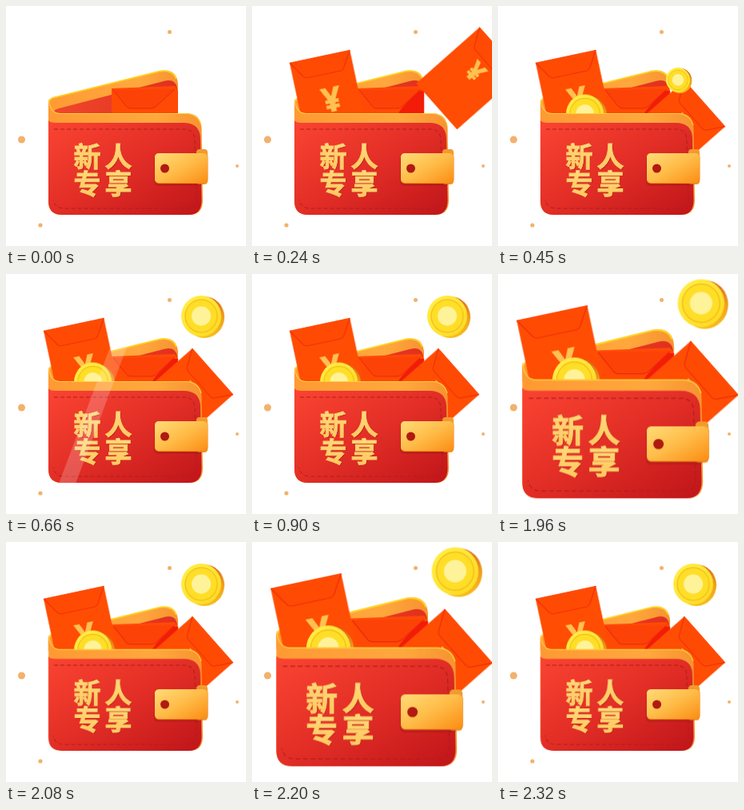
Recreate the animation shown at these times as an HTML page. Size 300x300 px, loop 3890 ms.

```html
<!DOCTYPE html>
<html lang="zh">
<head>
<meta charset="utf-8">
<title>新人专享</title>
<style>
html, body { margin: 0; width: 100%; height: 100%; overflow: hidden; background: #fff; }
svg { display: block; width: 100vw; height: 100vh; }
.pulse, .left, .right, .shade, .low, .high, .shine { animation: 3890ms linear infinite; }
.pulse { animation-name: pulse; transform-origin: 186px 147px; }
.left { animation-name: left; }
.right { animation-name: right; }
.shade { animation-name: shade; }
.low { animation-name: low; }
.high { animation-name: high; transform-origin: 246px 53px; }
.shine { animation-name: shine; }
.yen { font: 900 42px "Noto Sans", Arial, sans-serif; text-anchor: middle; fill: #ffc152; }
.title { font: 900 34px "Noto Sans CJK SC", "Noto Sans CJK", sans-serif; letter-spacing: 5px; }

/* two quick beats */
@keyframes pulse {
  0%, 47.275%, 53.445%, 59.614%, 100% { transform: scale(1); animation-timing-function: steps(4); }
  50.36%, 56.53% { transform: scale(1.17); animation-timing-function: steps(4); }
}
@keyframes left {
  0%, 1.53% { opacity: 0; transform: translate(-41px, -48px); }
  1.54% { opacity: 1; transform: translate(-41px, -48px); }
  6.17%, 100% { opacity: 1; transform: none; }
}
@keyframes right {
  0%, 3.85% { opacity: 0; transform: translate(90px, -84px); }
  3.86% { opacity: 1; transform: translate(90px, -84px); }
  6.17% { opacity: 1; transform: translate(52px, -67px); }
  9.25%, 100% { opacity: 1; transform: translate(0, 0); }
}
@keyframes shade {
  0%, 3.86% { opacity: 0; }
  6.17%, 100% { opacity: 1; }
}
@keyframes low {
  0%, 8.47% { opacity: 0; transform: translateY(-75px); }
  8.48% { opacity: 1; transform: translateY(-75px); }
  11.57%, 100% { opacity: 1; transform: none; }
}
@keyframes high {
  0%, 10.02% { opacity: 0; transform: translate(-30px, 60px) scale(.4); }
  10.03% { opacity: 1; transform: translate(-30px, 60px) scale(.4); }
  14.65%, 100% { opacity: 1; transform: translate(0, 0) scale(1); }
}
@keyframes shine {
  0%, 15.39% { opacity: 0; transform: translateX(-37px); }
  15.4% { opacity: 1; transform: translateX(-37px); animation-timing-function: steps(10); }
  23.12% { opacity: 1; transform: translateX(218px); }
  23.13%, 100% { opacity: 0; transform: translateX(218px); }
}
</style>
</head>
<body>
<svg viewBox="0 0 300 300">
  <defs>
    <linearGradient id="body" x1="0" y1="0" x2="1" y2="1">
      <stop offset="0" stop-color="#fb4432"/><stop offset=".5" stop-color="#e22e26"/><stop offset="1" stop-color="#c0151a"/>
    </linearGradient>
    <linearGradient id="rim" x1="0" y1="0" x2="1" y2="0">
      <stop offset="0" stop-color="#ff9a33"/><stop offset=".7" stop-color="#ffa83e"/><stop offset="1" stop-color="#f79330"/>
    </linearGradient>
    <linearGradient id="inner" x1="0" y1="0" x2="1" y2="0">
      <stop offset="0" stop-color="#f0472d"/><stop offset="1" stop-color="#e2301f"/>
    </linearGradient>
    <linearGradient id="gold" x1="0" y1="0" x2="1" y2="1">
      <stop offset="0" stop-color="#ffdc78"/><stop offset=".5" stop-color="#ffbc48"/><stop offset="1" stop-color="#fb8d14"/>
    </linearGradient>
    <linearGradient id="ink" x1="0" y1="0" x2="0" y2="1">
      <stop offset="0" stop-color="#ffdf83"/><stop offset="1" stop-color="#ffc558"/>
    </linearGradient>
    <linearGradient id="edge" x1="0" y1="0" x2="0" y2="1">
      <stop offset="0" stop-color="#d9601c"/><stop offset=".5" stop-color="#f0a01c"/><stop offset="1" stop-color="#f7c01c"/>
    </linearGradient>
    <linearGradient id="face" x1="0" y1="0" x2="1" y2="1">
      <stop offset="0" stop-color="#fff04a"/><stop offset="1" stop-color="#ffd820"/>
    </linearGradient>
    <path id="back" d="M53 136V121Q53 116 59 114L193 81Q213 78 215 97V140Z"/>
    <path id="front" d="M53 116Q54 134 68 134H225Q243 134 244.500 152L246 243Q246 261 229 261H70Q53 261 53 244Z"/>
    <g id="envelope">
      <rect width="77" height="106" rx="1" fill="#ff4d03"/>
      <path d="M0 0L13 20Q15 23 19 23H60Q63 23 65 20L77 0" fill="#ff4a04" stroke="#ee2a08"/>
    </g>
    <g id="coin">
      <ellipse cx="2" cy="1" rx="25" ry="26" fill="url(#edge)"/>
      <ellipse cx="-2" cy="-.5" rx="25" ry="25.500" fill="url(#face)"/>
      <ellipse cx="-2" cy="-.5" rx="20" ry="20.500" fill="#ffde28" stroke="#f3bd16" stroke-width="1.200"/>
      <circle cx="-2" cy="-.5" r="12" fill="#fff39a"/>
    </g>
    <clipPath id="art">
      <use href="#back"/>
      <use href="#front"/>
      <rect x="6" width="71" height="106" transform="translate(47 71) rotate(-12)"/>
      <rect width="77" height="106" transform="translate(233 93) rotate(48.5)"/>
      <circle cx="246" cy="53" r="26"/>
      <rect x="186" y="184" width="66" height="38" rx="5"/>
    </clipPath>
  </defs>

  <g fill="#f3b16c">
    <circle cx="19.500" cy="167" r="4.500"/>
    <circle cx="204.500" cy="32.500" r="2.500"/>
    <circle cx="289" cy="200" r="2"/>
    <circle cx="43" cy="274" r="2.600"/>
  </g>

  <g class="pulse">
    <use href="#back" fill="url(#rim)"/>
    <path d="M54 119Q55 116 60 114.500L193 81.500Q208 79.500 213 91" fill="none" stroke="#ffd21f" stroke-width="1.800"/>
    <path d="M58 136Q58 130 66 128L197 94Q212 90 214 103V136Z" fill="url(#inner)"/>

    <path d="M132 103L211 100L215 106V136H132Z" fill="#ff4a06"/>
    <path d="M134 105L150 125Q152 128 156 128H181Q184 128 187 126L211 104" fill="#fc4207" stroke="#ea2a08"/>
    <path class="shade" d="M183 134Q187 126 209 106H215V134Z" fill="#f21c09"/>

    <g class="left">
      <g transform="translate(47 71) rotate(-12)">
        <use href="#envelope"/>
        <text class="yen" x="42" y="71" stroke="#ffc152">¥</text>
      </g>
    </g>
    <g class="right">
      <g transform="translate(233 93) rotate(48.5)">
        <use href="#envelope"/>
        <text class="yen" x="38" y="53" style="font-size:34px" stroke="#ffc152">¥</text>
      </g>
    </g>
    <g class="low"><use href="#coin" transform="translate(110.500 135) scale(.94)"/></g>

    <use href="#front" fill="url(#rim)"/>
    <path d="M53.500 117Q55 134.500 68 134.500H225Q240 135 244 149" fill="none" stroke="#ffcd3c" stroke-width="1.200"/>
    <path d="M53 143Q55 146 62 146H222Q242 146 243 165L244.500 243Q244.500 261 228 261H70Q53 261 53 244Z" fill="url(#body)"/>
    <path d="M60 154H222Q235 154 236 167L238 240Q238 253 226 253H73Q61 253 59 242" fill="none" stroke="#b01f1c" stroke-dasharray="5 3"/>

    <g class="title">
      <text x="85.500" y="202" fill="#b7201a">新人</text>
      <text x="85.500" y="235.500" fill="#b7201a">专享</text>
      <g fill="url(#ink)" stroke="#ffd06c" stroke-width=".9">
        <text x="84.500" y="201">新人</text>
        <text x="84.500" y="234.500">专享</text>
      </g>
    </g>

    <rect x="238" y="179" width="14" height="44" rx="4" fill="#f29a2e"/>
    <rect x="185" y="187" width="61" height="38" rx="5" fill="#9c1715" opacity=".35"/>
    <rect x="186" y="184" width="66.500" height="38" rx="5" fill="#f08a1c"/>
    <rect x="186" y="184" width="66" height="37" rx="5" fill="url(#gold)"/>
    <circle cx="198.500" cy="203" r="5.500" fill="#b01a10"/>

    <g class="high"><use href="#coin" transform="translate(246 53)"/></g>

    <g clip-path="url(#art)">
      <path class="shine" d="M52 262H73L142 78H121Z" fill="#fff" opacity=".2" fill-opacity=".2"/>
    </g>
  </g>
</svg>
</body>
</html>
```
